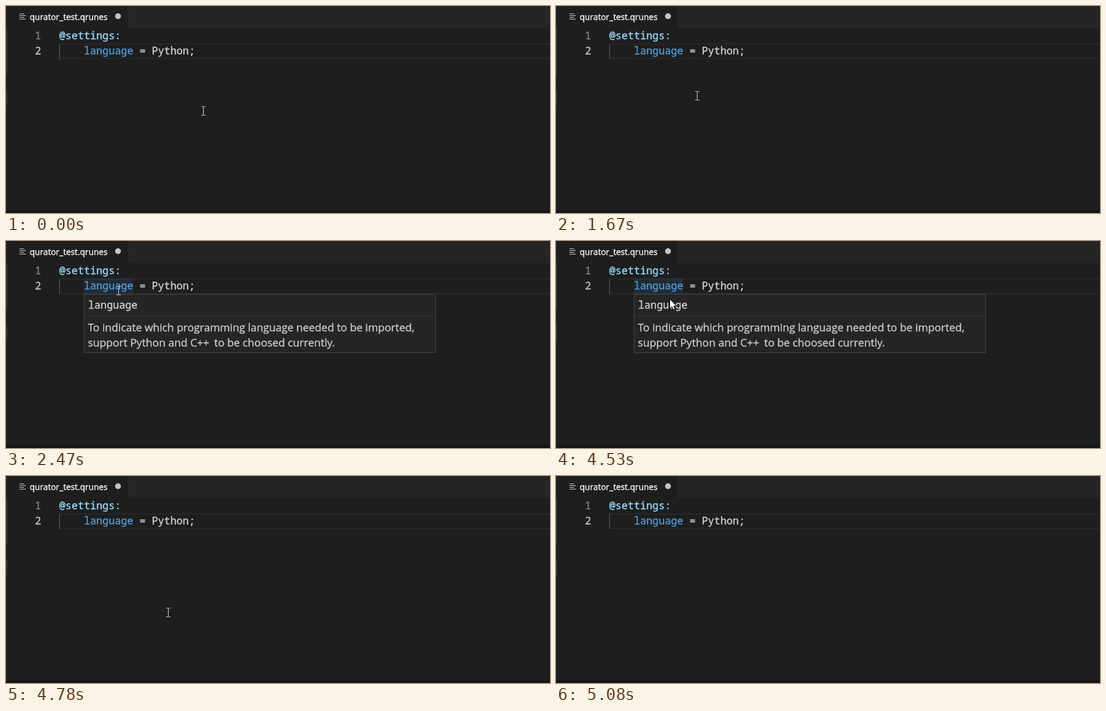
These frames come from a looping animation (930x355 px, 5.76 s). An HTML page with a canvas:

```html
<!DOCTYPE html>
<html lang="en">
<head>
<meta charset="utf-8">
<title>Hover help in a code editor</title>
<style>
html, body { margin: 0; width: 100%; height: 100%; overflow: hidden; background: #1e1e1e; }
canvas { display: block; width: 930px; height: 355px; }
</style>
</head>
<body>
<canvas id="stage" width="930" height="355"></canvas>
<script>
const ctx = document.getElementById('stage').getContext('2d');
const LOOP = 5760;
const CHAR = 10.55;
const CODE_X = 91;
const MONO = CHAR / 0.6 + 'px "Noto Sans Mono", monospace';
const UI = '"Open Sans", sans-serif';
const HOVER = { from: 2470, to: 4780 };

// start time, pointer kind, left, top
const POINTER = [
  [0, 'beam', 334, 172],
  [1130, 'beam', 332, 171],
  [1270, 'beam', 321, 171],
  [1395, 'beam', 298, 172],
  [1520, 'beam', 272, 172],
  [1670, 'beam', 238, 146],
  [1800, 'beam', 208, 114],
  [1940, 'beam', 194, 91],
  [2060, 'beam', 189, 79],
  [2470, 'beam', 189, 77],
  [4530, 'arrow', 194, 99],
  [4650, 'arrow', 228, 152],
  [4780, 'beam', 274, 226],
  [4930, 'beam', 405, 291],
  [5080, 'none', 0, 0]
];

function box(x, y, w, h, color) {
  ctx.fillStyle = color;
  ctx.fillRect(x, y, w, h);
}

// A hairline stroke gives the letters a slightly heavier weight.
function text(str, x, y, color, font = MONO) {
  ctx.font = font;
  ctx.fillStyle = ctx.strokeStyle = color;
  ctx.lineWidth = 0.35;
  ctx.fillText(str, x, y);
  ctx.strokeText(str, x, y);
}

function code(str, column, y, color) {
  text(str, CODE_X + column * CHAR, y, color);
}

function drawTab() {
  box(0, 0, 930, 38, '#252526');
  box(2, 0, 206, 38, '#1e1e1e');
  [8, 11, 8, 11].forEach((w, i) => box(23, 13 + i * 3, w, 1, '#d0d0d0'));
  text('qurator_test.qrunes', 40.5, 24, '#ffffff', '14.35px ' + UI);
  ctx.fillStyle = '#c5c5c5';
  ctx.beginPath();
  ctx.arc(191.5, 17.5, 5, 0, Math.PI * 2);
  ctx.fill();
}

function drawEdges() {
  box(0, 0, 2, 355, '#252526');
  box(0, 38, 2, 79, '#37373a');
  box(0, 144, 2, 26, '#37373a');
  box(0, 350, 930, 5, '#1b1417');
}

function drawCode(hover) {
  box(92, 64, 838, 2, '#282828');
  box(92, 89, 838, 2, '#282828');
  box(CODE_X, 65, 1, 26, '#606060');
  if (hover) box(CODE_X + 4 * CHAR, 64, 8 * CHAR, 27, 'rgba(38, 79, 120, 0.25)');

  text('1', 49.5, 57, '#858585');
  text('2', 49.5, 83, '#c6c6c6');
  code('@settings:', 0, 57, '#9cdcfe');
  code('language', 4, 83, '#569cd6');
  code('= Python;', 13, 83, '#d4d4d4');
}

function drawHover() {
  box(133, 91, 602, 101, '#454545');
  box(134, 92, 600, 99, '#252526');
  box(134, 128, 600, 1, '#353536');
  text('language', 140.5, 116, '#d4d4d4');
  const font = '18.35px ' + UI;
  text('To indicate which programming language needed to be imported,', 140, 155, '#cccccc', font);
  text('support Python and C++', 140, 181, '#cccccc', font);
  text('to be choosed currently.', 356, 181, '#cccccc', font);
}

function drawBeam(x, y) {
  for (const row of [0, 15]) {
    box(x, y + row, 3, 1, '#e1e1e1');
    box(x + 4, y + row, 3, 1, '#e1e1e1');
  }
  box(x + 3, y + 1, 1, 14, '#e1e1e1');
}

function drawArrow(x, y) {
  const points = [[0, 0], [0, 16.5], [3.8, 13], [6.3, 18.7], [9, 17.5], [6.6, 12], [11.7, 12]];
  ctx.beginPath();
  for (const [px, py] of points) ctx.lineTo(x + px + 0.5, y + py + 0.5);
  ctx.closePath();
  ctx.fillStyle = '#ffffff';
  ctx.fill();
  ctx.strokeStyle = '#000000';
  ctx.lineWidth = 1;
  ctx.stroke();
}

function draw(t) {
  const hover = t >= HOVER.from && t < HOVER.to;
  box(0, 0, 930, 355, '#1e1e1e');
  drawTab();
  drawEdges();
  drawCode(hover);
  if (hover) drawHover();

  const [, kind, x, y] = POINTER.findLast(step => step[0] <= t);
  if (kind === 'beam') drawBeam(x, y);
  if (kind === 'arrow') drawArrow(x, y);
}

const start = performance.now();
function tick() {
  draw((performance.now() - start) % LOOP);
  requestAnimationFrame(tick);
}
tick();
</script>
</body>
</html>
```
